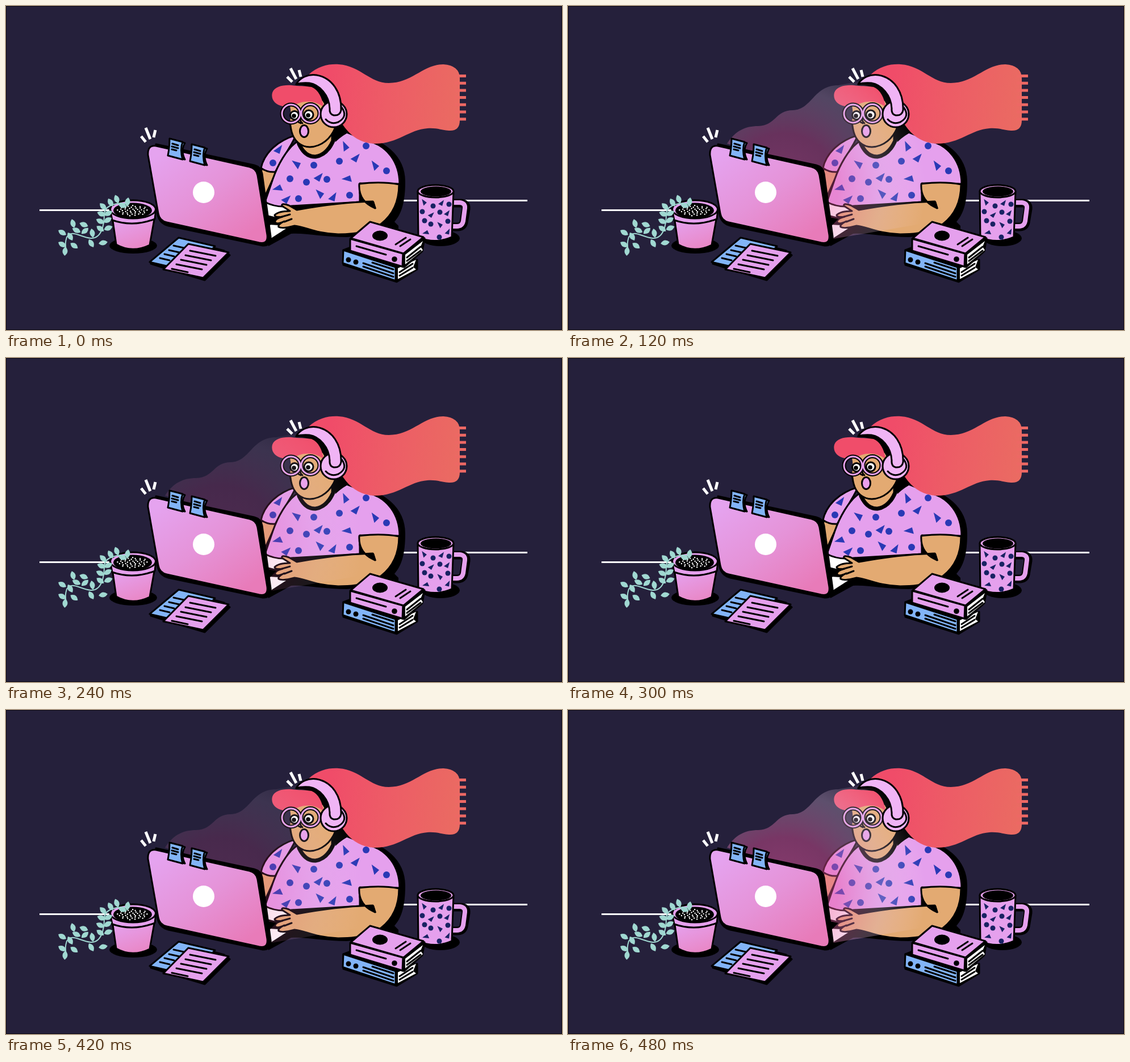
Write an HTML page that moves like this. It is 979x572 px and loops after 3630 ms.

```html
<!DOCTYPE html>
<html lang="en">
<head>
<meta charset="utf-8">
<title>Screen glow</title>
<style>
  html, body { margin: 0; width: 100%; height: 100%; overflow: hidden; background: #25203b; }
  svg { display: block; width: 100vw; height: 100vh; }
  .ink { stroke: #000; stroke-width: 3; stroke-linejoin: round; stroke-linecap: round; }
  .line { fill: none; }
  .lilac { fill: #e5a0ed; }
  .pale { fill: #f0b4f5; }
  .blue { fill: #82b4f7; }
  .skin { fill: #e3aa72; }
  .white { fill: #fff; }
  .mark { stroke: #fff; stroke-width: 5; fill: none; }
  .leaf { fill: #a0d8d1; }
</style>
</head>
<body>
<svg viewBox="0 0 979 572" preserveAspectRatio="none">
  <defs>
    <linearGradient id="hair" gradientUnits="userSpaceOnUse" x1="570" y1="140" x2="800" y2="165">
      <stop stop-color="#f04c69"/><stop offset=".45" stop-color="#ed5c66"/><stop offset="1" stop-color="#ea6b62"/>
    </linearGradient>
    <linearGradient id="lid" gradientUnits="userSpaceOnUse" x1="285" y1="250" x2="405" y2="420">
      <stop stop-color="#e5a3ef"/><stop offset=".5" stop-color="#e593d8"/><stop offset="1" stop-color="#e87bb9"/>
    </linearGradient>
    <linearGradient id="pot" x1=".2" y1="0" x2=".7" y2="1">
      <stop stop-color="#e5a0ed"/><stop offset="1" stop-color="#e986c4"/>
    </linearGradient>
    <radialGradient id="light" gradientUnits="userSpaceOnUse" cx="380" cy="320" r="250">
      <stop stop-color="#f05aa5" stop-opacity=".5"/>
      <stop offset=".38" stop-color="#eb559f" stop-opacity=".42"/>
      <stop offset=".7" stop-color="#e1bee1" stop-opacity=".3"/>
      <stop offset="1" stop-color="#ffe0f0" stop-opacity="0"/>
    </radialGradient>
  </defs>

  <rect x=".5" y=".5" width="978" height="571" fill="#25203b" stroke="#0b0914"/>
  <path d="M59 360.5H186M689 343.5H918" stroke="#fff" stroke-width="3"/>

  <!-- body -->
  <path d="M598 220C664 232 703 262 703 310C703 345 697 366 684 381L691 388V400L600 408C560 408 525 400 502 402L462 424L440 300Z"/>
  <path class="ink skin" d="M449 288C446 305 449 330 454 340L476 292Z"/>
  <path class="white" d="M454 347L488 353L500 360L476 373L456 368ZM463 386L480 387L493 393L462 413Z"/>
  <path class="ink lilac" d="M511 228C480 237 455 258 449 286Q460 294 474 293L503 243Z"/>
  <path class="ink lilac" d="M512 240C494 252 478 282 470 305L456 346Q476 357 503 353L623 346V313L693 314C693 275 670 247 640 239L590 219L560 250Z"/>
  <g id="shirt" fill="#2939b5"></g>
  <path class="ink skin" d="M692 315Q660 309 622 314Q620 345 650 357L646 345C600 346 550 353 512 360L498 352Q484 347 486 353L500 362Q480 362 473 369Q473 374 487 372Q472 376 474 382Q478 386 490 380Q478 386 480 390Q486 394 508 388C525 389 545 402 585 403C620 403 645 397 660 385C682 368 692 345 692 315Z"/>
  <path d="M621 327Q628 345 652 358L648 345L624 346Z"/>
  <path class="ink line" stroke-width="2" d="M486 372L500 368M490 381L503 376"/>
  <path class="skin" d="M514 232L516 244Q527 267 545 266Q565 263 576 238V220Z" stroke="#000" stroke-width="7"/>
  <path d="M572 207L590 205L606 222Q594 227 580 240Z"/>

  <!-- hair and head -->
  <path fill="url(#hair)" d="M532 122C550 105 570 102 586 103C625 106 640 136 674 136C715 136 735 103 770 103Q799 105 799 128V202Q799 221 780 220C765 219 760 215 742 216C710 218 690 243 650 243C625 242 608 231 594 211L560 165Z"/>
  <path stroke="#ed6864" stroke-width="5" d="M790 123.500h20m-20 12.700h20m-20 12.700h20m-20 12.700h20m-20 12.700h20m-20 12.700h20m-20 12.700h20"/>
  <path class="ink skin" d="M497 174C497 192 500 207 502 218C506 239 520 249 535 249C556 248 572 234 580 214L566 168L530 160Z"/>
  <path d="M508 140C537 138 549 150 561 174L554 181L590 212L594 190L570 150L535 130Z"/>
  <path fill="#f04d6a" d="M487 177C473 174 466 164 469 153C473 142 488 139 503 140C520 142 525 141 538 143C550 148 557 162 559 178C546 168 529 166 514 172C503 177 497 180 487 177Z"/>
  <path class="ink line" d="M519 193Q516 203 522 207M515 205L519 207"/>
  <ellipse class="ink" cx="525" cy="221" rx="7.500" ry="10.500" fill="#eaa0ed"/>
  <circle cx="502" cy="190" r="15" fill="#25203b"/>
  <path class="skin" d="M500 176Q516 178 516 190Q515 202 500 204Q503 192 500 176Z"/>
  <g fill="none">
    <circle class="white ink" cx="508" cy="193" r="7.500"/>
    <circle class="white ink" cx="533" cy="192" r="8"/>
    <circle cx="507" cy="194" r="3.800" fill="#000"/>
    <circle cx="532" cy="193" r="3.800" fill="#000"/>
    <g id="glasses">
      <circle cx="502" cy="190" r="16" stroke="#000" stroke-width="7"/>
      <circle cx="536" cy="189.500" r="16" stroke="#000" stroke-width="7"/>
      <circle cx="502" cy="190" r="16" stroke="#e7a1ed" stroke-width="3"/>
      <circle cx="536" cy="189.500" r="16" stroke="#e7a1ed" stroke-width="3"/>
    </g>
  </g>
  <path id="glow" opacity="0" fill="url(#light)" d="M280 243C295 220 312 212 335 212C366 211 365 184 396 184C430 183 432 140 476 140L560 125L640 180V350L620 385L462 412L440 290Z"/>
  <circle class="ink pale" cx="577" cy="191" r="23"/>
  <path class="ink line" d="M591 179Q603 195 585 205Q572 210 563 200"/>
  <path class="ink pale" d="M511 138C518 126 532 120 547 122C575 127 591 153 590 184Q588 194 577 193Q569 191 570 181C569 157 552 139 534 136Q520 135 511 138Z"/>
  <path class="mark" d="M495 125L504 134M501 110L511 129M516 113L519 125M238 230L246 240M246 215L254 235M263 219L260 232"/>

  <!-- laptop -->
  <path d="M455 372L476 376L464 388Z"/>
  <path class="ink" d="M264 244L437 281Q449 284 451 296L466 407Q467 424 452 423L286 388Q270 384 267 368Z"/>
  <path class="ink" fill="url(#lid)" d="M264 247L429 284Q441 287 443 299L460 404Q462 421 446 418L283 382Q270 379 268 366L250 263Q249 245 264 247Z"/>
  <circle class="white" cx="348" cy="329" r="19"/>
  <g id="note">
    <path class="ink" d="M289 235L315 242Q307 255 315 271L290 265Z"/>
    <path class="ink" fill="inherit" d="M288 234L311 240Q306 254 311 271L285 264Q288 250 288 234Z"/>
    <path class="ink line" stroke-width="2" d="M293 243L303 246M292 248L303 251M292 253L300 255"/>
  </g>
  <use href="#note" x="39" y="10" fill="#e5a0ed"/>

  <!-- plant -->
  <ellipse cx="224" cy="423" rx="42" ry="14"/>
  <path class="ink" fill="url(#pot)" d="M188 379L194 421Q222 437 253 422L261 377Z"/>
  <path class="ink lilac" d="M183 358L187 378Q224 391 262 376L264 359Z"/>
  <ellipse class="ink lilac" cx="223.500" cy="359" rx="40" ry="16"/>
  <ellipse cx="223" cy="361" rx="34" ry="13.500"/>
  <g id="soil" class="white"></g>
  <path fill="none" stroke="#a0d8d1" stroke-width="2" d="M216 350C195 345 174 352 173 367C173 385 169 411 149 410C130 408 116 394 107 408Q103 420 106 430"/>
  <g id="leaves" class="leaf"></g>

  <!-- papers -->
  <path class="ink" d="M255 455L280 463L350 484L394 440L384 432L306 411Z"/>
  <path class="ink blue" d="M304 409L368 424L326 469L253 452Z"/>
  <path class="ink line" stroke-width="2.500" d="M295 423l18 4m-26 4l18 4m-26 3l17 4m-25 3l17 4"/>
  <path class="ink lilac" d="M321 420L392 435L347 480L277 465Z"/>
  <path class="ink line" d="M324 432l45 9m-53 -1l45 9m-53 -1l45 9m-53 -1l45 9m-53 -1l28 6"/>

  <!-- mug -->
  <ellipse cx="765" cy="410" rx="34" ry="14"/>
  <path fill="none" stroke="#000" stroke-width="15" d="M787 348H801Q811 349 810 358L806 382Q804 390 795 390H784"/>
  <path fill="none" stroke="#e5a0ed" stroke-width="8" d="M785 347H799Q809 348 808 357L805 380Q803 389 794 389H782"/>
  <path class="ink lilac" d="M725 327L726 408Q755 421 785 408L788 327Z"/>
  <ellipse class="ink lilac" cx="756.500" cy="327" rx="31.500" ry="11"/>
  <ellipse cx="757" cy="327.500" rx="27" ry="9"/>
  <g id="cup" fill="#182263"></g>

  <!-- books -->
  <path class="ink" d="M594 431L607 426L687 451L724 448V465L688 487L594 457Z"/>
  <path class="ink blue" d="M594 431L686 461V485L593 454Z"/>
  <path class="white" d="M690 463L722 448L717 461L722 465L690 482Z"/>
  <path class="ink line" stroke-width="2" d="M629 454L682 472M629 460L682 478M645 453L682 465M693 470L716 455M693 476L716 462"/>
  <circle cx="603" cy="448" r="4.500"/><circle cx="616" cy="452" r="4.500"/>
  <path class="ink" d="M643 382L737 410L733 433L701 461L606 433L608 410Z"/>
  <path class="ink lilac" d="M606 411L699 437L698 460L606 432Z"/>
  <path class="ink lilac" d="M641 381L735 408L700 437L607 410Z"/>
  <path class="white" d="M703 439L734 415L730 425L734 431L703 456Z"/>
  <path class="ink line" stroke-width="2" d="M617 424L669 439M686 421L704 409M694 424L712 412M706 444L730 425M706 450L730 432"/>
  <ellipse cx="658.500" cy="405.500" rx="13.500" ry="9"/>
  <circle cx="684" cy="447" r="4.800"/>
</svg>
<script>
const $ = id => document.getElementById(id);
$('note').setAttribute('fill', '#82b4f7');

const dot = (x, y, r) => `<circle cx="${x}" cy="${y}" r="${r}"/>`;
const wedge = (x, y, a, s = 1) =>
  `<path d="M-9-2L7-6L8 6Z" transform="translate(${x} ${y}) rotate(${a}) scale(${s})"/>`;

$('shirt').innerHTML =
  [[470,277],[542,281],[587,274],[634,247],[500,305],[529,311],[565,306],[670,291],[515,340],[605,334]]
    .map(([x, y]) => dot(x, y, 6)).join('') +
  [[480,252,120],[510,279,30],[551,301,125],[596,247,60],[616,267,125],[648,281,50],
   [478,323,-20],[551,331,40],[576,336,115],[600,306,-10],[494,340,130]]
    .map(p => wedge(...p)).join('');

$('cup').innerHTML =
  [[733,363],[752,353],[764,364],[780,350],[748,385],[778,380],[763,408],[737,379]]
    .map(([x, y]) => dot(x, y, 4.5)).join('') +
  [[735,346,50],[767,347,120],[749,368,130],[777,365,120],[763,386,40],[739,401,-20],[778,398,110]]
    .map(p => wedge(...p, .65)).join('');

// flecks spread over the soil on a sunflower spiral
$('soil').innerHTML = Array.from({ length: 42 }, (_, i) => {
  const r = Math.sqrt((i + .5) / 42), a = i * 2.4;
  return dot(223 + 28 * r * Math.cos(a), 361 + 9.5 * r * Math.sin(a), 1.2);
}).join('');

$('leaves').innerHTML =
  [[195,341,70],[214,346,100],[205,352,20],[184,347,60],[171,354,45],[168,367,20],[180,366,-25],
   [166,380,25],[179,378,-30],[180,392,-20],[166,393,35],[171,418,-10],[152,401,80],[150,419,60],
   [137,386,20],[118,384,75],[124,396,25],[139,397,-40],[113,407,60],[99,400,30],[120,423,35],[104,433,95],[99,421,30]]
    .map(([x, y, a]) => `<path d="M-8 0Q0-9 8 0Q0 9-8 0Z" transform="translate(${x} ${y}) rotate(${a})"/>`).join('');

// flicker: [time, strength], then steady until the loop restarts
const LOOP = 3630, STEP = 30;
const keys = [[0, 0], [150, 1], [300, 0], [360, .65], [420, .42], [480, 1], [LOOP, 1]];

function strength(t) {
  const i = keys.findIndex(k => k[0] > t);
  const [t0, a] = keys[i - 1], [t1, b] = keys[i];
  return a + (b - a) * (t - t0) / (t1 - t0);
}

function draw() {
  const t = performance.now() % LOOP;
  $('glow').setAttribute('opacity', strength(Math.floor(t / STEP) * STEP));
  requestAnimationFrame(draw);
}
draw();
</script>
</body>
</html>
```
